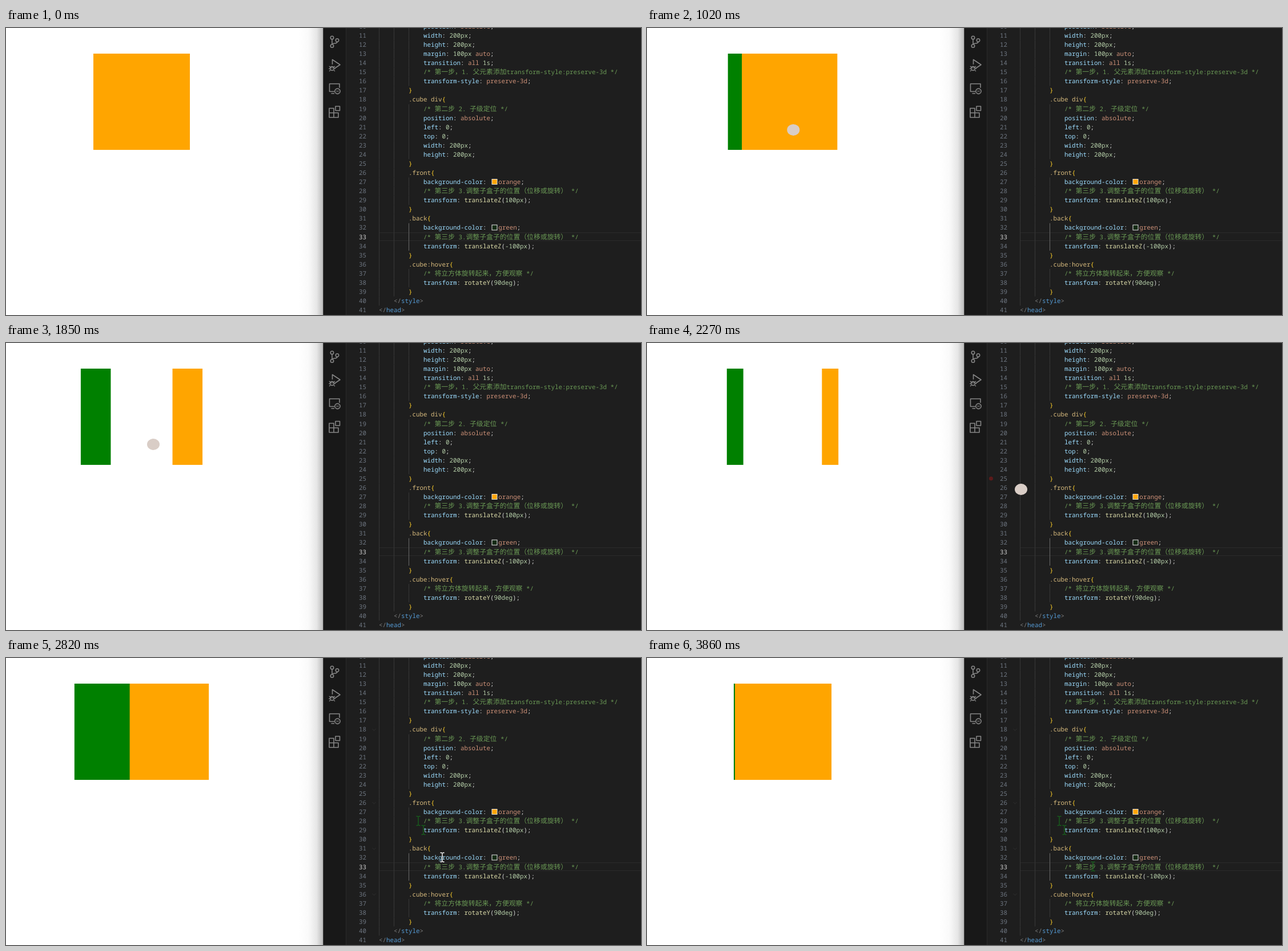
Recreate the animation shown at these times as an HTML page. Size 1112 by 504 pixels, loop 3930 ms.

```html
<!DOCTYPE html>
<html lang="zh">
<head>
<meta charset="utf-8">
<title>Cube hover</title>
<style>
  html, body { margin: 0; width: 100%; height: 100%; overflow: hidden; background: #fff; }
  svg { display: block; width: 1112px; height: 504px; }
  text { font: 500 10.83px "Noto Sans Mono", "DejaVu Sans Mono", monospace; white-space: pre; fill: #d4d4d4; text-rendering: geometricPrecision; }
  .cjk { font-family: "Noto Sans CJK SC", "Noto Sans CJK", sans-serif; font-size: 11.85px; font-weight: 400; }
  .comment { fill: #6a9955; }
  .tag { fill: #569cd6; }
  .angle { fill: #808080; }
  .selector { fill: #d7ba7d; }
  .prop { fill: #9cdcfe; }
  .func { fill: #dcdcaa; }
  .num { fill: #b5cea8; }
  .value { fill: #ce9178; }
  .brace { fill: #ffd02a; }
  .lineno { fill: #6e7681; text-anchor: end; }
  .lineno.active { fill: #d0d0d0; }
  .icons { fill: none; stroke: #868686; stroke-width: 1.6; stroke-linejoin: round; }
  #caret { color: #fff; }
  .ghost { color: #17601c; }
</style>
</head>
<body>
<svg viewBox="0 0 1112 504">
  <defs>
    <linearGradient id="shade">
      <stop offset="0" stop-color="#fff"/>
      <stop offset=".4" stop-color="#fafafa"/>
      <stop offset=".75" stop-color="#e6e6e6"/>
      <stop offset="1" stop-color="#bcbcbc"/>
    </linearGradient>
    <path id="beam" fill="none" stroke="currentColor" stroke-width="1.4" d="M-3.5-8h2L0-7 1.5-8h2M0-7V7M-3.5 8h2L0 7 1.5 8h2"/>
    <path id="chevron" d="M-3-1.5 0 1.5 3-1.5" fill="none" stroke="#303030"/>
  </defs>
  <rect width="1112" height="504" fill="#fff"/>
  <rect x="512" width="43" height="504" fill="url(#shade)"/>
  <rect id="back" y="45" height="169" fill="#008000"/>
  <rect id="front" y="45" height="169" fill="#ffa500"/>

  <rect x="555" width="557" height="504" fill="#1e1e1e"/>
  <rect x="555" width="40" height="504" fill="#181818"/>
  <path d="M555.5 0V504" stroke="#4a4a4a"/>
  <path d="M595.5 0V504" stroke="#292929"/>
  <g class="icons">
    <circle cx="571" cy="17" r="2.7"/><circle cx="571" cy="31.5" r="2.7"/><circle cx="580" cy="21.5" r="2.7"/>
    <path d="M571 20v8.5M580 24.5c0 4-9 1-9 4.5"/>
    <path d="M571.5 64V55.5L585 64.5 576 70.5"/>
    <circle cx="571" cy="71" r="3.4"/>
    <path d="M567.5 70h7M566 67l2 2M576 67l-2 2M565 71.5h2.5M574.5 71.5H577M566 76l2-2M576 76l-2-2" stroke-width="1.2"/>
    <path d="M575 111.5H566.5V98h17.5v7M569.5 115h5.5"/>
    <circle cx="580.5" cy="111" r="4.6"/>
    <path d="M578.5 112.5l1.5-1.5-1.5-1.5M582.5 112.5L581 111l1.5-1.5" stroke-width="1"/>
    <path d="M566 141h8v16h-8zM566 149h16v8h-8M577 137.5h7.500v7.500H577z"/>
  </g>
  <g id="code"></g>
  <g id="chevrons"></g>
  <g class="ghost">
    <g id="trail"><use href="#beam" x="722" y="286"/><use href="#beam" x="731" y="302"/></g>
    <use id="lastTrail" href="#beam" x="781" y="366"/>
  </g>
  <circle id="dot" cx="602.5" cy="238" r="3.5" fill="#5c1a1a"/>
  <ellipse id="paw" cx="12" cy="13" rx="11" ry="10" fill="#d9cdc6"/>
  <use id="caret" href="#beam"/>
</svg>
<script>
const $ = id => document.getElementById(id);

function add(parent, name, attrs, text = '') {
  const node = document.createElementNS('http://www.w3.org/2000/svg', name);
  for (const key in attrs) node.setAttribute(key, attrs[key]);
  node.textContent = text;
  return parent.appendChild(node);
}

// Editor: the leading digit is the indent, "@" stands for a colour swatch.
const FIRST = 10, ROW = 16.07, LEFT = 653, TAB = 26;
const lines = `3position: relative;
3width: 200px;
3height: 200px;
3margin: 100px auto;
3transition: all 1s;
3/* 第一步，1. 父元素添加transform-style:preserve-3d */
3transform-style: preserve-3d;
2}
2.cube div{
3/* 第二步 2. 子级定位 */
3position: absolute;
3left: 0;
3top: 0;
3width: 200px;
3height: 200px;
2}
2.front{
3background-color: @orange;
3/* 第三步 3.调整子盒子的位置（位移或旋转） */
3transform: translateZ(100px);
2}
2.back{
3background-color: @green;
3/* 第三步 3.调整子盒子的位置（位移或旋转） */
3transform: translateZ(-100px);
2}
2.cube:hover{
3/* 将立方体旋转起来，方便观察 */
3transform: rotateY(90deg);
2}
1</style>
0</head>`.split('\n');

const kinds = {
  comment: '\\/\\*.*\\*\\/',
  selector: '\\.[a-z]+[^{]*(?=\\{)',
  tag: '(?<=<\\/)\\w+',
  angle: '<\\/|>',
  prop: '[a-z][a-z-]*(?=:)',
  func: '\\w+(?=\\()',
  num: '-?\\d+\\w*',
  value: '[a-z][\\w-]*',
  brace: '[{}]',
  swatch: '@',
  plain: '[\\s:;()]+'
};
const lexer = new RegExp(Object.entries(kinds).map(([k, r]) => `(?<${k}>${r})`).join('|'), 'g');
const baseline = n => 17 + (n - 11) * ROW;

function drawLine(source, index) {
  const code = $('code'), n = FIRST + index, y = baseline(n), active = n === 33;
  const indent = +source[0], x = LEFT + indent * TAB;
  if (active) add(code, 'path', { d: 'M653 359.5H1112M653 373.5H1112', stroke: '#2b2b2b' });
  for (let i = 0; i < indent; i++)
    add(code, 'rect', {
      x: LEFT + i * TAB, y: y - 11.7, width: 1, height: ROW,
      fill: i === 2 && n > 31 && n < 35 ? '#6a6a6a' : '#383838'
    });
  add(code, 'text', { x: 631, y, class: active ? 'lineno active' : 'lineno' }, n);

  const text = add(code, 'text', { x, y });
  let gap = 0;
  for (const match of source.slice(1).matchAll(lexer)) {
    const kind = Object.keys(kinds).find(k => match.groups[k] !== undefined);
    if (kind === 'swatch') {
      add(code, 'rect', {
        x: x + match.index * 6.5 + 3, y: y - 8.6, width: 9, height: 9,
        fill: source.includes('orange') ? '#ffa500' : '#142a14', stroke: '#e8e8e8'
      });
      gap = 14.4;
      continue;
    }
    for (const run of match[0].match(/[\u3000-\uffff]+|[^\u3000-\uffff]+/g)) {
      add(text, 'tspan', { dx: gap, class: kind + (run > '\u3000' ? ' cjk' : '') }, run);
      gap = 0;
    }
  }
}
lines.forEach(drawLine);
for (const n of [18, 26, 31, 36]) add($('chevrons'), 'use', { href: '#chevron', x: 644.5, y: baseline(n) - 3.5 });

// Moments at which the picture refreshes (first, last, count), in whole hundredths of a second.
const LOOP = 3930;
const ticks = [
  [120, 610, 8], [680, 1160, 8], [1230, 1720, 8], [1790, 2270, 8],
  [2340, 2820, 8], [2890, 3390, 8], [3440, 3860, 7]
].flatMap(([a, b, n]) => Array.from({ length: n }, (_, i) => 10 * Math.floor((a + (b - a) * i / (n - 1)) / 10)));
const snap = t => ticks.reduce((last, tick) => tick <= t ? tick : last, 0);

// CSS "ease": cubic-bezier(.25, .1, .25, 1)
function ease(x) {
  if (x <= 0) return 0;
  if (x >= 1) return 1;
  const bezier = (u, a, b) => 3 * u * (1 - u) ** 2 * a + 3 * u * u * (1 - u) * b + u ** 3;
  let lo = 0, hi = 1;
  for (let i = 0; i < 24; i++) {
    const mid = (lo + hi) / 2;
    if (bezier(mid, .25, .25) < x) lo = mid; else hi = mid;
  }
  return bezier(lo, .1, 1);
}

// Hover turns the cube; leaving reverses it with a shortened duration.
const ENTER = 815, LEAVE = 2180, DURATION = 2085;
const turn = t => ease((t - ENTER) / DURATION);
const peak = turn(LEAVE);
const progress = t => t < LEAVE ? turn(t) : peak * (1 - ease((t - LEAVE) / (DURATION * peak)));

const route = [
  [120, 980, 481], [610, 414, 298], [815, 310, 208], [950, 244, 166], [1510, 246, 165],
  [2130, 246, 165], [2200, 590, 225], [2270, 643, 244], [2340, 722, 286], [2410, 731, 302],
  [2500, 764, 350], [2820, 764, 350], [2890, 781, 366], [3040, 999, 485]
];
function pointerAt(t) {
  const i = route.findIndex(p => p[0] > t);
  if (i === 0) return route[0].slice(1);
  if (i < 0) return route[route.length - 1].slice(1);
  const [a, b] = [route[i - 1], route[i]], k = (t - a[0]) / (b[0] - a[0]);
  return [a[1] + (b[1] - a[1]) * k, a[2] + (b[2] - a[2]) * k];
}

const show = (id, on) => $(id).setAttribute('visibility', on ? 'visible' : 'hidden');

function placeFace(id, centre, halfWidth) {
  $(id).setAttribute('x', centre - halfWidth);
  $(id).setAttribute('width', 2 * halfWidth);
}

function render(t) {
  const angle = progress(t) * Math.PI / 2, half = 84.5, middle = 237.5;
  const offset = half * Math.sin(angle), width = half * Math.cos(angle);
  placeFace('back', middle - offset, width);
  placeFace('front', middle + offset, width);

  const [x, y] = pointerAt(t), visible = t >= 120 && t < 3110;
  for (const id of ['paw', 'caret']) $(id).setAttribute('transform', `translate(${x} ${y})`);
  show('paw', visible && x < LEFT);
  show('caret', visible && x >= LEFT);
  show('dot', t >= 2190 && t < 2335);
  show('chevrons', t >= 2335);
  show('trail', t >= 2405);
  show('lastTrail', t >= 2950);
}

function frame() {
  render(snap(performance.now() % LOOP));
  requestAnimationFrame(frame);
}
frame();
</script>
</body>
</html>
```
